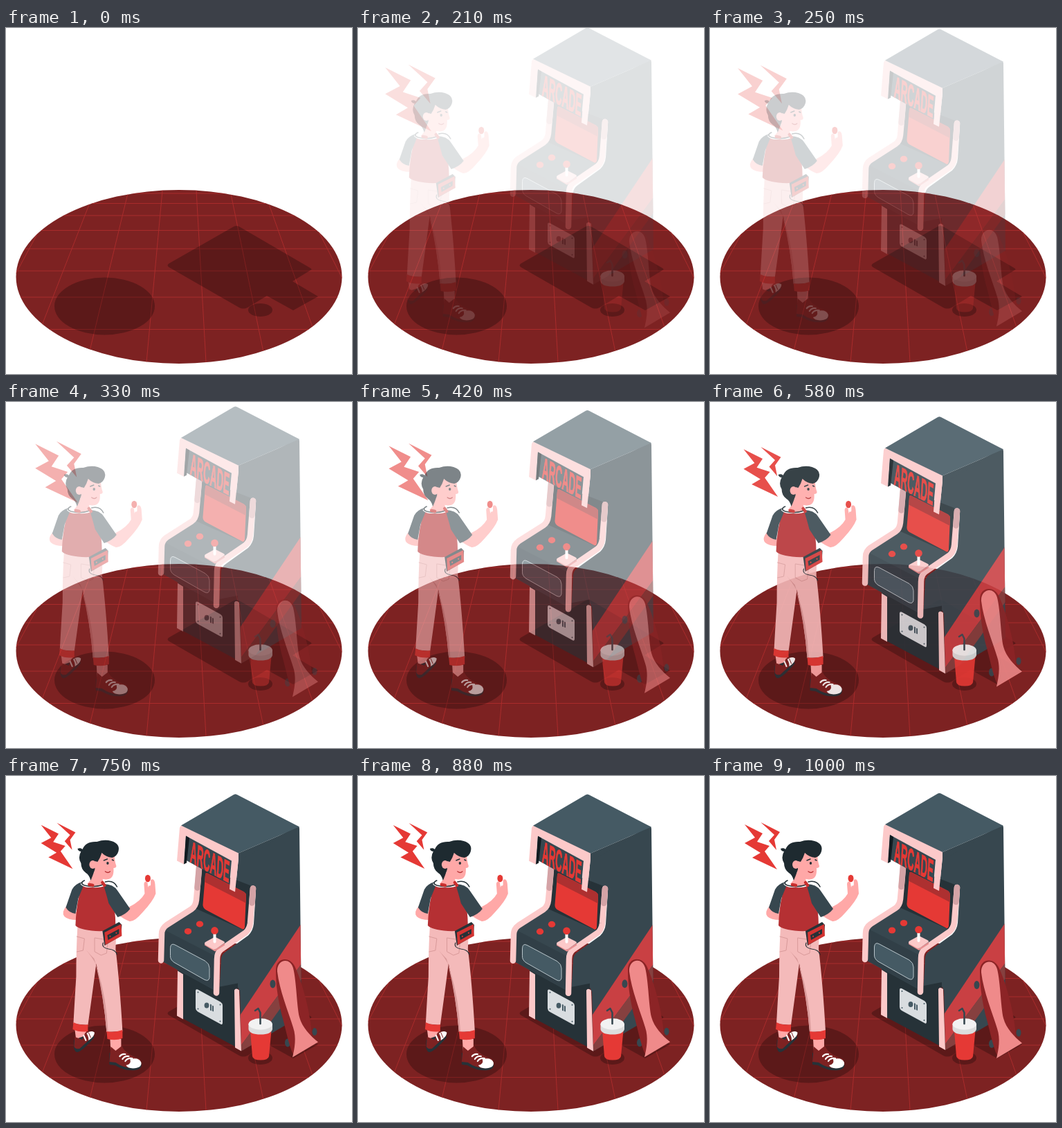
Write an HTML page that moves like this. It is 500 by 500 pixels and loops after 1040 ms.

```html
<!DOCTYPE html>
<html lang="en">
<head>
<meta charset="utf-8">
<title>Arcade</title>
<style>
html, body { margin: 0; width: 100%; height: 100%; overflow: hidden; background: #fff; }
svg { display: block; width: 100vw; height: 100vh; }
.line { fill: none; stroke-linecap: round; stroke-linejoin: round; }
.dark { fill: #263238; }
.slate { fill: #37474f; }
.steel { fill: #455a64; }
.red { fill: #e53935; }
.pink { fill: #fcc9c9; }
.skin { fill: #ffa8a7; }
.maroon { fill: #7d2222; }
</style>
</head>
<body>
<svg viewBox="0 0 500 500">
  <defs>
    <clipPath id="rug"><ellipse cx="250" cy="359.5" rx="235.5" ry="125.5"/></clipPath>
    <clipPath id="side"><path id="sidePath" d="M336 117L421 71Q424 71 424 75L427 345L340 396L338 310L333 300L308 313L311 262Q312 256 318 252L350 229Q357 222 358 212L361 165L354 157L331 167Z"/></clipPath>
    <clipPath id="glass"><path d="M291 139L344 166Q347 168 347 171L345 217Q344 222 340 219L289 192Q284 189 284.500 184L288 141Q288 138 291 139Z"/></clipPath>
  </defs>

  <g clip-path="url(#rug)">
    <rect class="maroon" y="230" width="500" height="260"/>
    <path id="grid" class="line" stroke="#ae2d2d" stroke-width=".9"/>
    <g opacity=".26">
      <ellipse cx="142.500" cy="402" rx="72.500" ry="41.500"/>
      <path d="M329 287Q333 285 337 287L440 347Q443 349 440 350L414 366L451 388L415 408L377 387L349 404Q343 407 337 404L236 346Q231 343 236 340Z"/>
      <ellipse cx="367.500" cy="407.500" rx="17.500" ry="9.500"/>
    </g>
  </g>

  <g id="cabinet">
    <use href="#sidePath" class="slate"/>
    <g clip-path="url(#side)">
      <path fill="#c94043" d="M430 207L335 349V394L430 266Z"/>
      <path fill="#86403f" d="M430 266L335 394V405L352 396L430 288Z"/>
    </g>
    <path class="dark" d="M248 277L304 304L335 298L334 391L250 346Z"/>
    <path class="pink" d="M248 280L256 285V350L247 345ZM330 308Q332 304 337 308L340 396L331 391Z"/>
    <path class="dark" d="M279 128L354 157L357 200L350 226L270 192L276 178Z"/>
    <g clip-path="url(#glass)">
      <path class="red" d="M280 130H350V225H280Z"/>
      <path fill="#ad3030" d="M280 130H350V184L280 148Z"/>
    </g>
    <path class="slate" d="M272 189L350 224L310 252L303 261L301 308L225 266V226Q225 219 232 214Z"/>
    <path class="dark" opacity=".35" d="M229 221L303 259L302 308L226 266Z"/>
    <path class="steel" stroke="#b9c5ca" stroke-width="1" d="M245 243L288 266Q294 270 294 276V290Q293 296 287 293L243 268Q237 264 237.500 258V247Q238 239 245 243Z"/>
    <path class="line" stroke="#fcc9c9" stroke-width="8.500" stroke-linecap="butt" d="M279 133L275 178Q274 187 268 191L232 214Q225 219 225 227L224 265M357 161L353 211Q352 220 346 225L311 249Q305 254 305 263L304 312"/>
    <path class="line" stroke="#d4a3a6" stroke-width="8.500" stroke-linecap="butt" d="M279 130L276.500 160M357 161L355.500 182"/>
    <g class="red">
      <ellipse cx="263" cy="223" rx="5.200" ry="4.500"/>
      <ellipse cx="280" cy="212.500" rx="5.200" ry="4.500"/>
    </g>
    <path fill="#e88f91" d="M287 240L302 249L316 240V243L302 252L287 243Z"/>
    <path class="pink" d="M289 238L300 232Q302 231 304 232L314 237Q318 239 314 241L304 248Q301 250 298 248L289 243Q285 240 289 238Z"/>
    <path class="line" stroke="#fff" stroke-width="4" d="M301.500 224V238"/>
    <circle class="red" cx="301.500" cy="222" r="5.300"/>

    <path class="pink" d="M253 70L336 108V118L331 166L323 162L326 121L260 85L257 126L247 121L251 73Z"/>
    <path class="steel" d="M253 70L329 25.500Q331.500 24 334 25.500L424 72L336 110Z"/>
    <path class="slate" d="M424 72L336 110V118L346 116Z"/>
    <path class="slate" d="M260 85L326 121L323 155L258 119Z"/>
    <path fill="#111b20" d="M260 85L265 88L261 124L257 126Z"/>
    <text class="red" transform="matrix(.308 .165 -.06 1 265.500 122.500)" font-family="'Liberation Sans', sans-serif" font-weight="700" font-size="43" stroke="#e53935" stroke-width=".9" vector-effect="non-scaling-stroke">ARCADE</text>

    <path fill="#d9dde0" d="M277 307L310 325Q313 327 313 330V355Q313 359 310 357L277 339Q274 337 274 334V309Q274 306 277 307Z"/>
    <g class="steel">
      <ellipse cx="290" cy="330" rx="3.400" ry="4"/>
      <path d="M295 328L297 329V338L295 337ZM298 330L300 331V339L298 338Z"/>
      <circle cx="277.500" cy="311" r="1"/><circle cx="309.500" cy="329" r="1"/>
      <circle cx="277.500" cy="335" r="1"/><circle cx="309.500" cy="353" r="1"/>
    </g>
  </g>

  <g id="board">
    <g class="slate">
      <ellipse cx="385.500" cy="302" rx="4" ry="6"/>
      <ellipse cx="407" cy="387" rx="4" ry="6"/>
      <ellipse cx="446" cy="371" rx="3.500" ry="5.500"/>
    </g>
    <path fill="#8c2426" d="M390 283C389 264 409 261 417 276C429 301 440 345 442 375L430 386L415 404C408 389 405 369 398 345C392 319 390 300 390 283Z"/>
    <path fill="#ef8a8a" d="M392 284C391 267 410 262 415 279C420 300 420 332 424 350C428 365 440 377 451 386L414 408C417 395 420 380 415 365C408 342 395 311 392 284Z"/>
  </g>

  <g id="cup">
    <path class="red" d="M353 368H383.500L380 405Q379 410.500 368 410.500Q357 410.500 356 405Z"/>
    <path fill="#dcdddd" d="M350.500 358H385V366Q383 373.500 368 373.500Q352 373.500 350.500 366Z"/>
    <ellipse fill="#f2f2f2" cx="367.700" cy="358.500" rx="17.200" ry="8.200"/>
    <path class="line" stroke="#37474f" stroke-width="2.600" d="M367.500 358V342L364.500 336L360 339"/>
  </g>

  <g id="bolts" class="red">
    <path d="M50 70L76 83L68 95L86 101L79 109L97 135L61 118L73 111L50 97L65 89Z"/>
    <path d="M73.500 67L101 81L93 92L96 107L85 94L93 85Z"/>
  </g>

  <g id="player">
    <path class="skin" d="M86 188Q78 197 83 203Q88 208 101 208L101 197Z"/>
    <path class="skin" d="M98 366H115L114 378L100 382ZM149 380H165V398H150Z"/>
    <path class="dark" d="M97 381Q95 398 101 399Q108 399 126 378L125 371Z"/>
    <path class="maroon" d="M98 377L109 381L113 371Q121 367 126 371Q127 376 118 382L105 394Q97 395 97 390Z"/>
    <path fill="#fff" d="M115 372Q121 367 126.500 370.500Q127 376 118 382Q118 376 115 372Z"/>
    <path class="line" stroke="#fff" stroke-width="2" d="M111 375L114 382"/>
    <path class="line" stroke="#7d2222" stroke-width="1" d="M118 371L121 378"/>
    <path class="dark" d="M148 400V417L156 418Q171 427 186 425Q196 423 194 415Z"/>
    <path class="maroon" d="M150 391L157 397L166 390Q171 402 192 409Q196 418 184 422Q170 423 157 414L148 413Z"/>
    <path fill="#fff" d="M178 409Q191 406 194 414Q195 422 182 422.500Q174 422 172 418Q180 417 178 409Z"/>
    <path class="line" stroke="#fff" stroke-width="2.200" d="M163 405Q166 401 171 402M167 409Q170 404 176 405M171 412Q174 407 181 408"/>

    <path fill="#f4baba" d="M102 217Q128 228 158 221L157 250Q163 300 167 369L144 370Q140 320 129 271Q124 310 117 360L96 358Q98 322 100 290Q100 250 102 217Z"/>
    <path fill="#d99a9a" d="M114 251Q122 260 126 264L131 280Q144 322 146 368L144 370Q140 320 128 271Q124 263 114 251Z"/>
    <path class="line" stroke="#d99a9a" stroke-width="1" d="M101 232L112 235L110 252L101 254M127 234L146 237L144 256L136 259L127 254Z"/>
    <path class="red" d="M96 356Q106 361 117 359L117 369Q105 371 95 366ZM144 369Q156 371 167 367L167 379Q157 383 145 380Z"/>

    <path class="skin" d="M121 138L138 144L139 157Q127 163 116 156L121 150Z"/>
    <path fill="#b53033" d="M108 157Q128 165 143 158L151 173Q157 190 157 219Q150 225 128 224Q104 222 99 216Q100 190 104 174Z"/>
    <path class="slate" d="M109 153Q98 156 94 164L85 190Q90 198 99 199L103 177L110 160Z"/>
    <path class="skin" d="M160 200L177 189Q193 181 199 170L198 156Q199 150 203 154L204 161L208 150Q213 147 214 156L215 170Q211 181 196 197Q184 211 177 210Q169 207 160 200Z"/>
    <path class="slate" d="M139 156Q154 156 160 166L178 192Q172 200 160 204L147 184Q144 172 139 156Z"/>
    <path class="line" stroke="#fff" stroke-width="3" d="M108 156Q114 161 125 159"/>
    <path class="line" stroke="#263238" stroke-width="1.600" d="M112 151Q104 155 112 158Q126 162 139 157M142 153Q154 150 159 160"/>
    <path class="line" stroke="#c9302f" stroke-width="4.500" d="M119 157L124 158M138 154L141 158"/>

    <path class="skin" d="M128 113L155 108Q155 122 158 130Q158 133 154 133Q155 147 147 149Q137 151 128 143L122 133Z"/>
    <path fill="#1e2a30" d="M102 105Q107 103 109 106Q114 94 130 95Q141 91 151 94Q164 98 161 109Q159 116 152 118Q143 117 137 111Q135 118 131 124L127 123L127 135Q124 144 121 151Q119 143 114 140Q107 135 107 126Q102 118 107 109Q103 109 102 105Z"/>
    <ellipse class="skin" cx="124" cy="128" rx="5" ry="6"/>
    <ellipse class="dark" cx="145.500" cy="126" rx="1.700" ry="2.100"/>
    <path class="line" stroke="#263238" stroke-width="1.500" d="M140 122L145 120M152 121L154 122"/>
    <path class="line" stroke="#b53033" stroke-width="1.300" d="M142 138Q146 141 149 138"/>

    <path class="line" stroke="#fff" stroke-width="3.500" d="M206 152V157"/>
    <ellipse class="red" cx="203.500" cy="148" rx="4" ry="5.200"/>

    <path class="line" stroke="#263238" stroke-width="1.100" d="M139 241Q136 248 147 250Q157 251 159 258"/>
    <path class="dark" d="M138 224L162 211L166 215L165 231L141 245Z"/>
    <path fill="#d23432" d="M141 226L165 214L166 231L142 244Z"/>
    <path class="dark" d="M145 230L162 221V228L146 237Z"/>
    <path class="line" stroke="#d23432" stroke-width="2" d="M149 231.500V232M158 226.500V227"/>
  </g>
</svg>
<script>
const LOOP = 1040, FPS = 24, SLIDE = 30;
const get = id => document.getElementById(id);

// floor grid in perspective
let grid = "";
for (let k = -4; k <= 5; k++) grid += `M${226 + 49 * k} 235L${203 + 86 * k} 483`;
for (const y of [239, 253.5, 271, 292.5, 319, 351, 389, 435.5]) grid += `M0 ${y}H500`;
get("grid").setAttribute("d", grid);

const curve = (a, b, s) => 3 * a * s * (1 - s) ** 2 + 3 * b * s * s * (1 - s) + s ** 3;

// cubic-bezier(.36, -.01, .5, 1.38)
function ease(t) {
  if (t <= 0 || t >= 1) return t <= 0 ? 0 : 1;
  let lo = 0, hi = 1;
  for (let i = 0; i < 24; i++) {
    const mid = (lo + hi) / 2;
    if (curve(.36, .5, mid) < t) lo = mid; else hi = mid;
  }
  return curve(-.01, 1.38, lo);
}

function pose(id, alpha, transform) {
  const el = get(id);
  el.setAttribute("opacity", alpha);
  if (transform) el.setAttribute("transform", transform);
}

function draw(ms) {
  const step = Math.min(FPS, Math.floor((ms % LOOP + 4) * FPS / 1000));
  const p = ease(step / FPS);
  const alpha = Math.max(0, Math.min(1, p));
  const off = SLIDE * (1 - p);
  pose("cabinet", alpha, `translate(0 ${-off})`);
  pose("board", alpha, `translate(0 ${off})`);
  pose("cup", alpha);
  pose("player", alpha, `translate(${-off} 0)`);
  pose("bolts", alpha, `translate(75.5 101) scale(${1.5 - p / 2}) translate(-75.5 -101)`);
}

let start;
function tick(now) {
  if (start === undefined) start = now;
  draw(Math.max(0, now - start));
  requestAnimationFrame(tick);
}
draw(0);
requestAnimationFrame(tick);
</script>
</body>
</html>
```
